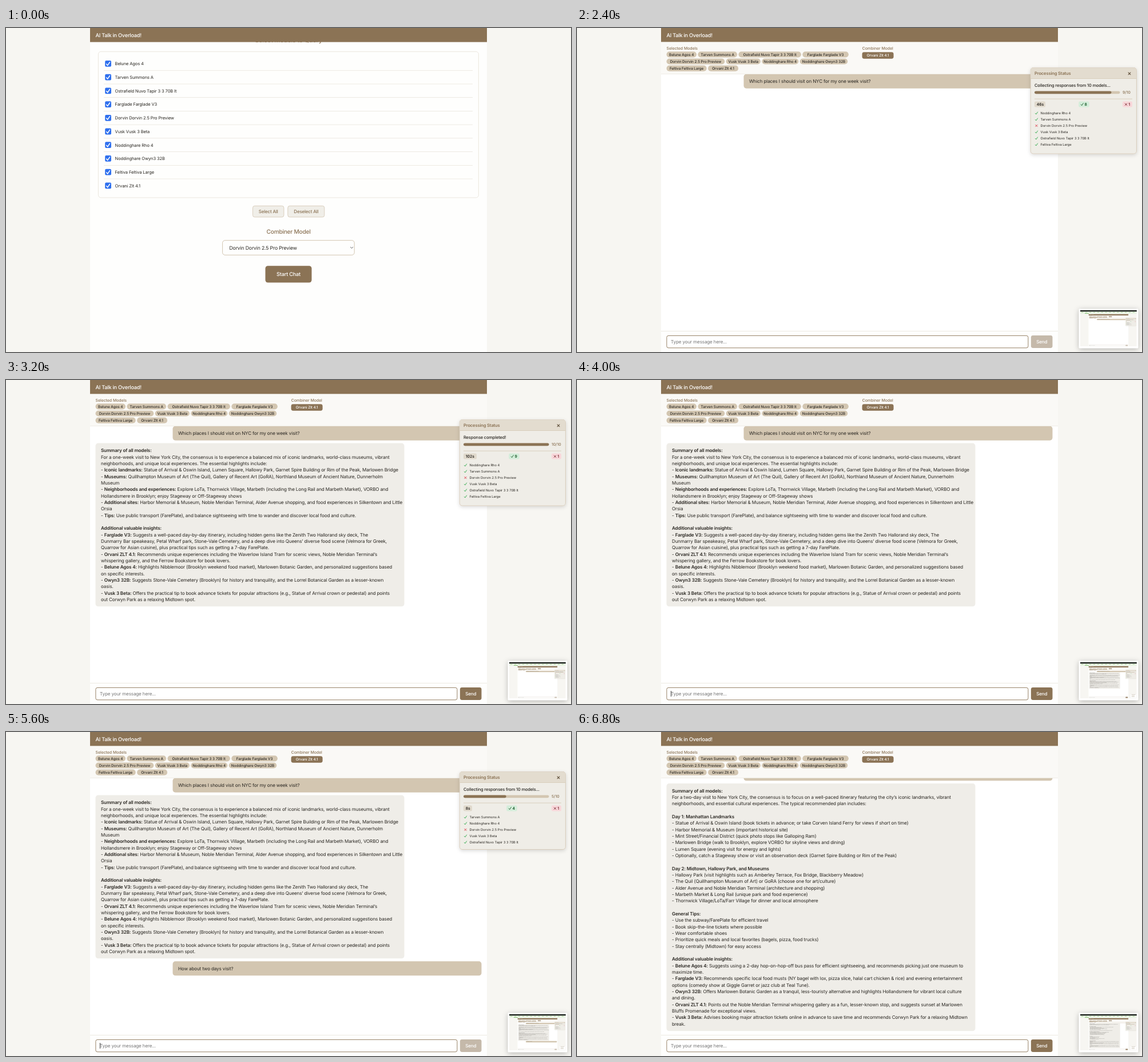
Recreate the animation shown at these times as an HTML page. Size 988x567 px, loop 8.4 s.

```html
<!DOCTYPE html>
<html lang="en">
<head>
<meta charset="utf-8">
<title>AI Talk in Overload!</title>
<style>
html, body { margin: 0; width: 100%; height: 100%; overflow: hidden; background: #f7f6f2; }
svg { display: block; width: 100vw; height: 100vh; }
text { font-family: Inter, Roboto, "Liberation Sans", sans-serif; text-rendering: geometricPrecision; white-space: pre; }
</style>
</head>
<body>
<svg viewBox="0 0 988 567" xmlns="http://www.w3.org/2000/svg">
  <defs>
    <clipPath id="log"><rect x="147" y="80.7" width="694" height="449.6"/></clipPath>
    <clipPath id="page"><rect width="988" height="567"/></clipPath>
    <filter id="soft" x="-20%" y="-20%" width="140%" height="150%">
      <feDropShadow dx="0" dy="2" stdDeviation="3" flood-color="#000" flood-opacity=".15"/>
    </filter>
    <filter id="deep" x="-30%" y="-30%" width="160%" height="170%">
      <feDropShadow dx="0" dy="2" stdDeviation="5" flood-color="#000" flood-opacity=".28"/>
    </filter>
  </defs>
  <g id="stage"></g>
</svg>
<script>
const BROWN = '#8b7355', TAN = '#d3c6b1', LINE = '#e6e1d7', INK = '#2a2722';
const LOOP = 8400, PITCH = 11.336;

const models = [
  'Belune Agos 4', 'Tarven Summons A', 'Ostrafield Nuvo Tapir 3 3 70B It',
  'Farglade Farglade V3', 'Dorvin Dorvin 2.5 Pro Preview', 'Vusk Vusk 3 Beta',
  'Noddinghare Rho 4', 'Noddinghare Owyn3 32B', 'Feltiva Feltiva Large', 'Orvani Zlt 4.1'
];

const weekPlan = `*Summary of all models:*
For a one-week visit to New York City, the consensus is to experience a balanced mix of iconic landmarks, world-class museums, vibrant
neighborhoods, and unique local experiences. The essential highlights include:
- *Iconic landmarks:* Statue of Arrival & Oswin Island, Lumen Square, Hallowy Park, Garnet Spire Building or Rim of the Peak, Marlowen Bridge
- *Museums:* Quillhampton Museum of Art (The Quil), Gallery of Recent Art (GoRA), Northland Museum of Ancient Nature, Dunnerholm
Museum
- *Neighborhoods and experiences:* Explore LoTa, Thornwick Village, Marbeth (including the Long Rail and Marbeth Market), VORBO and
Hollandsmere in Brooklyn; enjoy Stageway or Off-Stageway shows
- *Additional sites:* Harbor Memorial & Museum, Noble Meridian Terminal, Alder Avenue shopping, and food experiences in Silkentown and Little
Orsia
- *Tips:* Use public transport (FarePlate), and balance sightseeing with time to wander and discover local food and culture.

*Additional valuable insights:*
- *Farglade V3:* Suggests a well-paced day-by-day itinerary, including hidden gems like the Zenith Two Hallorand sky deck, The
Dunmarry Bar speakeasy, Petal Wharf park, Stone-Vale Cemetery, and a deep dive into Queens’ diverse food scene (Velmora for Greek,
Quarrow for Asian cuisine), plus practical tips such as getting a 7-day FarePlate.
- *Orvani ZLT 4.1:* Recommends unique experiences including the Waverlow Island Tram for scenic views, Noble Meridian Terminal’s
whispering gallery, and the Ferrow Bookstore for book lovers.
- *Belune Agos 4:* Highlights Nibblemoor (Brooklyn weekend food market), Marlowen Botanic Garden, and personalized suggestions based
on specific interests.
- *Owyn3 32B:* Suggests Stone-Vale Cemetery (Brooklyn) for history and tranquility, and the Lorrel Botanical Garden as a lesser-known
oasis.
- *Vusk 3 Beta:* Offers the practical tip to book advance tickets for popular attractions (e.g., Statue of Arrival crown or pedestal) and points
out Corwyn Park as a relaxing Midtown spot.`.split('\n');

const shortPlan = `*Summary of all models:*
For a two-day visit to New York City, the consensus is to focus on a well-paced itinerary featuring the city’s iconic landmarks, vibrant
neighborhoods, and essential cultural experiences. The typical recommended plan includes:

*Day 1: Manhattan Landmarks*
- Statue of Arrival & Oswin Island (book tickets in advance; or take Corven Island Ferry for views if short on time)
- Harbor Memorial & Museum (important historical site)
- Mint Street/Financial District (quick photo stops like Galloping Ram)
- Marlowen Bridge (walk to Brooklyn, explore VORBO for skyline views and dining)
- Lumen Square (evening visit for energy and lights)
- Optionally, catch a Stageway show or visit an observation deck (Garnet Spire Building or Rim of the Peak)

*Day 2: Midtown, Hallowy Park, and Museums*
- Hallowy Park (visit highlights such as Amberley Terrace, Fox Bridge, Blackberry Meadow)
- The Quil (Quillhampton Museum of Art) or GoRA (choose one for art/culture)
- Alder Avenue and Noble Meridian Terminal (architecture and shopping)
- Marbeth Market & Long Rail (unique park and food experience)
- Thornwick Village/LoTa/Farr Village for dinner and local atmosphere

*General Tips:*
- Use the subway/FarePlate for efficient travel
- Book skip-the-line tickets where possible
- Wear comfortable shoes
- Prioritize quick meals and local favorites (bagels, pizza, food trucks)
- Stay centrally (Midtown) for easy access

*Additional valuable insights:*
- *Belune Agos 4:* Suggests using a 2-day hop-on-hop-off bus pass for efficient sightseeing, and recommends picking just one museum to
maximize time.
- *Farglade V3:* Recommends specific local food musts (NY bagel with lox, pizza slice, halal cart chicken & rice) and evening entertainment
options (comedy show at Giggle Garret or jazz club at Teal Tune).
- *Owyn3 32B:* Offers Marlowen Botanic Garden as a tranquil, less-touristy alternative and highlights Hollandsmere for vibrant local culture
and dining.
- *Orvani ZLT 4.1:* Points out the Noble Meridian Terminal whispering gallery as a fun, lesser-known stop, and suggests sunset at Marlowen
Bluffs Promenade for exceptional views.
- *Vusk 3 Beta:* Advises booking major attraction tickets online in advance to save time and recommends Corwyn Park for a relaxing Midtown
break.`.split('\n');

const rect = (x, y, w, h, fill, r = 0, more = '') =>
  `<rect x="${x}" y="${y}" width="${w}" height="${h}" rx="${r}" fill="${fill}" ${more}/>`;
const edge = (color, width = .8) => `stroke="${color}" stroke-width="${width}"`;
const stroke = (d, color, width) =>
  `<path d="${d}" fill="none" ${edge(color, width)} stroke-linecap="round" stroke-linejoin="round"/>`;

// Places text by its vertical centre; tracking tightens as size grows.
function text(x, cy, str, size, { weight = 400, fill = INK, anchor = 'start' } = {}) {
  const track = (size >= 8 ? -.018 : size >= 7 ? -.014 : 0) - (weight > 400 ? .008 : 0);
  const body = str.replace(/\*(.+?)\*/g, '<tspan font-weight="600">$1</tspan>');
  return `<text x="${x}" y="${(cy + size * .36).toFixed(2)}" font-size="${size}" font-weight="${weight}" ` +
    `fill="${fill}" text-anchor="${anchor}" letter-spacing="${(track * size).toFixed(3)}">${body}</text>`;
}
const centred = (x, cy, str, size, weight, fill) => text(x, cy, str, size, { weight, fill, anchor: 'middle' });

const tick = (x, y, color, k = 1, w = .9) =>
  stroke(`M${x - 2 * k} ${y + .3 * k}l${1.4 * k} ${1.7 * k}l${2.7 * k} ${-4 * k}`, color, w);
const cross = (x, y, color, k = 1.7, w = .9) =>
  stroke(`M${x - k} ${y - k}l${2 * k} ${2 * k}m0 ${-2 * k}l${-2 * k} ${2 * k}`, color, w);

const frame = () => rect(0, 0, 988, 567, '#f7f6f2') + rect(147, 0, 694, 567, '#fefefd');
const header = () => rect(147, 0, 694, 24.6, BROWN) +
  text(156.5, 12.4, 'AI Talk in Overload!', 9.2, { weight: 500, fill: '#fff' });

function setup() {
  let s = frame() + centred(494, 21, 'Select Models to Query', 11.1, 500, BROWN);
  s += header() + rect(161.4, 41.3, 665, 255.6, '#fefefd', 4.6, edge(LINE));
  models.forEach((name, i) => {
    const y = 62.4 + i * 23.72;
    s += rect(173.2, y - 5.4, 10.8, 10.8, '#2f70ee', 2) + tick(178.5, y + .2, '#fff', 1.4, 1.5);
    s += text(190.6, y + .2, name, 7.5);
    if (i < 9) s += rect(171, y + 11.5, 645, .7, LINE);
  });
  for (const [x, w, label] of [[431.5, 54.4, 'Select All'], [492.8, 64, 'Deselect All']])
    s += rect(x, 311.3, w, 19.6, '#f0eee8', 3.4, edge(TAN)) + centred(x + w / 2, 321.2, label, 8, 500, BROWN);
  s += centred(494, 356, 'Combiner Model', 10.2, 500, BROWN);
  s += rect(378.6, 371.7, 230.6, 25.6, '#fefefd', 4.4, edge(TAN, 1));
  s += text(390.5, 384.6, models[4], 8.67) + stroke('M602.5 383.3l2.1 2.3l2.1 -2.3', '#555', .9);
  s += rect(453.5, 416.2, 81, 29.4, BROWN, 4.6) + centred(494, 431, 'Start Chat', 9.2, 500, '#fff');
  return s;
}

function modelBar() {
  const rows = [[52.5, 68.7, 109.4, 80.6], [101.8, 60.2, 64, 83.6], [70.2, 53]];
  let s = rect(147, 24.6, 694, 56, '#faf9f6') + rect(147, 80.1, 694, .7, LINE);
  s += text(156.5, 35.2, 'Selected Models', 6.94, { weight: 500, fill: BROWN });
  s += text(498.7, 35.2, 'Combiner Model', 6.94, { weight: 500, fill: BROWN });
  let n = 0;
  rows.forEach((widths, r) => {
    let x = 156.5;
    const y = 46.3 + r * 12.2;
    for (const w of widths) {
      s += rect(x, y - 5.1, w, 10.2, TAN, 5.1) + centred(x + w / 2, y, models[n++], 6.36, 500, INK);
      x += w + 2.4;
    }
  });
  return s + rect(498.6, 42.3, 55, 11.4, BROWN, 3.4) + centred(526.1, 48, models[9], 6.36, 500, '#fff');
}

const question = (y, str) => rect(291.5, y, 540, 25, TAN, 4.6) + text(301, y + 12.6, str, 8.1);
const answer = (y, lines) => rect(156.5, y, 540, lines.length * PITCH + 13.7, '#efede8', 4.6) +
  lines.map((l, i) => l && text(166, y + 12.7 + i * PITCH, l, 8.1)).join('');

function chat(c) {
  let s = '';
  if (c.final) s += question(60.3, 'How about two days visit?') + answer(90.1, shortPlan);
  else {
    s += question(80.7, 'Which places I should visit on NYC for my one week visit?');
    if (c.week) s += answer(110.6, weekPlan);
    if (c.next) s += question(401.3, 'How about two days visit?');
  }
  return rect(147, 80.8, 694, 449.5, '#fff') + `<g clip-path="url(#log)">${s}</g>`;
}

function composer(c) {
  let s = rect(147, 530.2, 694, .7, LINE);
  s += rect(156.9, 538.4, 632, 21.4, '#fff', 3, edge(BROWN, .9));
  s += text(164, 549.2, 'Type your message here...', 8.1, { fill: '#777' });
  if (c.caret) s += rect(164, 544, .8, 10, '#111');
  return s + rect(793.9, 538, 37.6, 22, c.busy ? '#c5b9aa' : BROWN, 3.4) +
    centred(812.7, 549.2, 'Send', 8.1, 500, '#fff');
}

function panel({ label, done, secs, bad = 0, order = [] }) {
  const list = order.slice(0, done).slice(0, 6);
  const bottom = list.length > 5 ? 220 : 150.5 + 11 * list.length;
  const timeW = 11 + 4 * String(secs).length, badW = bad ? 17 : 18, okW = 18.5;
  const okX = 800 + timeW + (171 - timeW - badW - okW) / 2, badX = 971 - badW;
  let s = rect(793.2, 69.4, 185.2, bottom - 69.4, '#efede7', 4.6, edge(TAN) + ' filter="url(#soft)"');
  s += '<path d="M793.6 88.6V74a4.2 4.2 0 0 1 4.2-4.2h176a4.2 4.2 0 0 1 4.2 4.2v14.6z" fill="#e3dccf"/>';
  s += rect(793.4, 88.3, 184.8, .7, TAN);
  s += text(800, 79.3, 'Processing Status', 7.6, { weight: 600, fill: BROWN }) + cross(966, 79.7, '#5f4f3a', 1.9, 1.1);
  s += text(800, 100.3, label, 7.5, { weight: 500 });
  s += rect(800, 110.4, 149.5, 4.8, TAN, 2.4);
  if (done) s += rect(800, 110.4, 14.95 * done, 4.8, BROWN, 2.4);
  s += text(954, 113, done + '/10', 6.8, { weight: 500, fill: BROWN });
  s += rect(800, 123.7, 171, .8, TAN);
  s += rect(800, 128.6, timeW, 10, '#e0d9cc', 2.3) + text(803.8, 133.7, secs + 's', 6.8, { weight: 600 });
  s += rect(okX, 128.6, okW, 10, '#d4edda', 2.3) + tick(okX + 6, 133.6, '#155724') +
    text(okX + 10.3, 133.7, String(done - bad), 6.8, { weight: 600, fill: '#155724' });
  s += rect(badX, 128.6, badW, 10, '#f8d7da', 2.3) + cross(badX + 6, 133.7, '#721c24') +
    text(badX + 10.3, 133.7, String(bad), 6.8, { weight: 600, fill: '#721c24' });
  list.forEach((id, i) => {
    const y = 149 + 11 * i;
    s += id === 4 ? cross(803.4, y, '#dc3545', 1.6) : tick(803.4, y, '#28a745');
    s += text(810.5, y, models[id], 5.78);
  });
  return s;
}

// Floating preview: the page itself at a tenth of its size.
function preview(c) {
  let s = rect(877.8, 491.5, 103.4, 68.8, '#fff', 1.2, 'filter="url(#deep)"');
  s += rect(880, 494, 98.8, 2.4, '#0c120c') + rect(880, 496.4, 98.8, 4.2, '#eaf4e4');
  for (let i = 0; i < 14; i++) s += rect(882 + i * 6.9, 497.2, 3.4, .6, '#8cc478');
  s += rect(888, 499, 7, .8, '#6fb45c');
  return s + `<g transform="translate(880 500.6) scale(.1)" clip-path="url(#page)">${page(c, true)}</g>`;
}

function page(c, small) {
  if (c.setup) return setup();
  let s = frame() + header() + modelBar() + chat(c) + composer(c);
  if (c.panel) s += panel(c.panel);
  if (c.thumb) s += small
    ? rect(877.8, 491.5, 103.4, 68.8, '#fff', 1.2, 'filter="url(#deep)"') + rect(895, 500.6, 69, 3, BROWN) + rect(897, 512, 54, 30, '#e6e3dc')
    : preview(c.thumb);
  return s;
}

const collecting = 'Collecting responses from 10 models...';
const combining = 'Combiner model is processing responses...';
const completed = 'Response completed!';
const first = [6, 1, 4, 5, 2, 8], second = [1, 6, 4, 5, 2, 8];

const start = { busy: true, panel: { label: collecting, done: 0, secs: 0 } };
const some = { busy: true, caret: true, panel: { label: collecting, done: 5, secs: 8, bad: 1, order: first } };
const most = { busy: true, thumb: some, panel: { label: collecting, done: 9, secs: 46, bad: 1, order: first } };
const merge = { busy: true, caret: true, panel: { label: combining, done: 10, secs: 98, bad: 1, order: first } };
const week = { week: true, thumb: merge, panel: { label: completed, done: 10, secs: 102, bad: 1, order: first } };
const rest = { week: true, caret: true, thumb: week };
const asked = { week: true, next: true, busy: true, caret: true, panel: start.panel };
const again = { ...asked, panel: { label: collecting, done: 5, secs: 8, bad: 1, order: second } };
again.thumb = { ...again, thumb: week };
const ready = { final: true, caret: true, thumb: again.thumb, panel: { label: completed, done: 10, secs: 64, bad: 1, order: second } };
const end = { final: true, thumb: ready };

const timeline = [
  [0, { setup: true }], [1600, start], [2000, some], [2400, most], [2800, merge], [3200, week],
  [4000, rest], [4800, asked], [5600, again], [6000, ready], [6800, end]
];

const stage = document.getElementById('stage');
const t0 = performance.now();
let shown;

function update() {
  const t = (performance.now() - t0) % LOOP;
  const scene = timeline.filter(([from]) => from <= t).pop()[1];
  if (scene !== shown) stage.innerHTML = page(shown = scene);
  requestAnimationFrame(update);
}
update();
</script>
</body>
</html>
```
